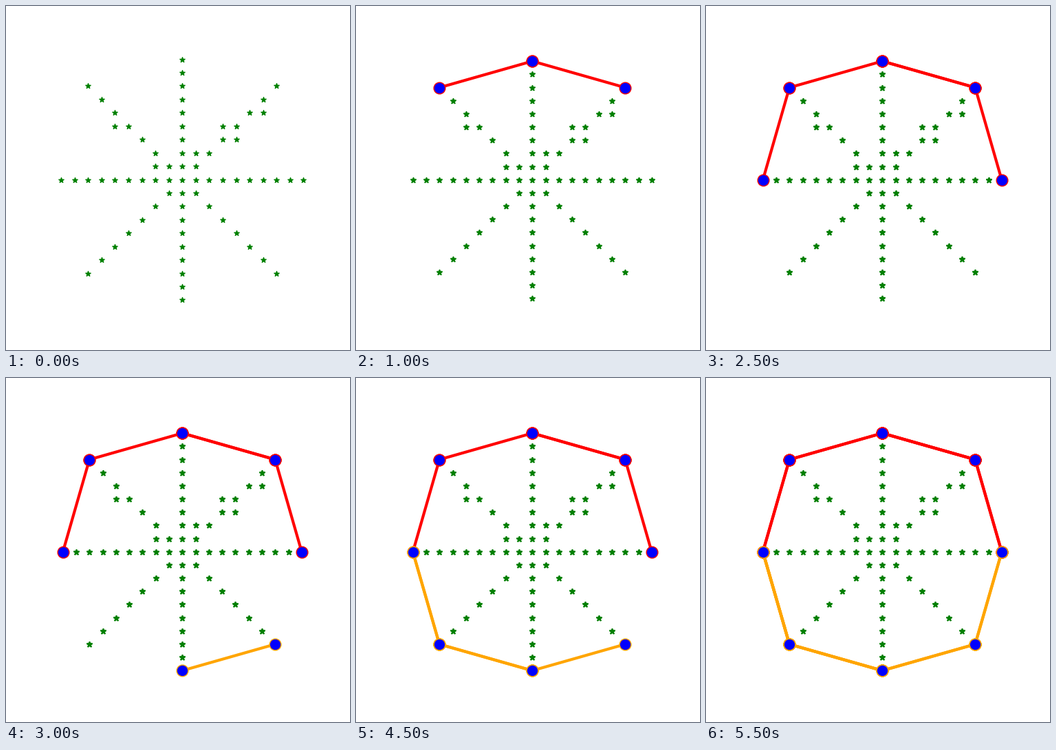
Recreate the animation shown at these times as a matplotlib script. Size 500x500 px, loop 6 s.

```python
import matplotlib.pyplot as plt
from matplotlib.animation import FuncAnimation

FRAMES = 12
INTERVAL = 500
LAST_STAR_LAYER = 5

# Hull corners
E, NE, N, NW = (9, 0), (7, 7), (0, 9), (-7, 7)
W, SW, S, SE = (-9, 0), (-7, -7), (0, -9), (7, -7)

UPPER = [(N, NE), (N, NW), (NW, W), (NE, E)]
LOWER = [(S, SE), (S, SW), (SW, W), (SE, E)]

# Edges plotted at each step; revisited edges are stacked on the earlier ones.
STEPS = {
    1: [(N, NE)],
    2: [(N, NW)],
    3: [(NW, W)],
    4: [(N, NE)],
    5: [(NE, E)],
    6: [(S, SE)],
    7: [(S, SW)],
    8: [(SW, W)],
    9: [(S, SW), (SW, W)],
    10: [(SW, W), (SE, E)],
    11: UPPER + LOWER,
}


def star_points():
    points = {(k, 0) for k in range(-9, 10)} | {(0, k) for k in range(-9, 10)}
    for k in range(-7, 8):
        points |= {(k, k), (k, -k)}
    points |= {(-5, 4), (-2, 1), (1, 2), (4, 3), (3, 4), (6, 5)}
    return sorted(points)


def plot_edge(edge):
    xs, ys = zip(*edge)
    color = "red" if edge in UPPER else "orange"
    line, = ax.plot(xs, ys, "o-", color=color, linewidth=3,
                    markersize=12, markerfacecolor="blue")
    return line


fig, ax = plt.subplots(figsize=(5, 5), dpi=100)
ax.axis("off")

star_x, star_y = zip(*star_points())
layers = [(step, ax.scatter(star_x, star_y, s=30, linewidths=1, color="green", marker="*"))
          for step in range(LAST_STAR_LAYER + 1)]
layers += [(step, plot_edge(edge)) for step, edges in STEPS.items() for edge in edges]


def update(frame):
    # The view widens slightly once the first edge is plotted.
    if frame == 0:
        ax.set(xlim=(-9.903, 9.903), ylim=(-9.903, 9.903))
    else:
        ax.set(xlim=(-10.046, 10.046), ylim=(-10.027, 10.054))
    for step, artist in layers:
        artist.set_visible(step <= frame)
    return [artist for _, artist in layers]


anim = FuncAnimation(fig, update, frames=FRAMES, interval=INTERVAL,
                     init_func=lambda: update(0), repeat=True, repeat_delay=0)
plt.show()
```
